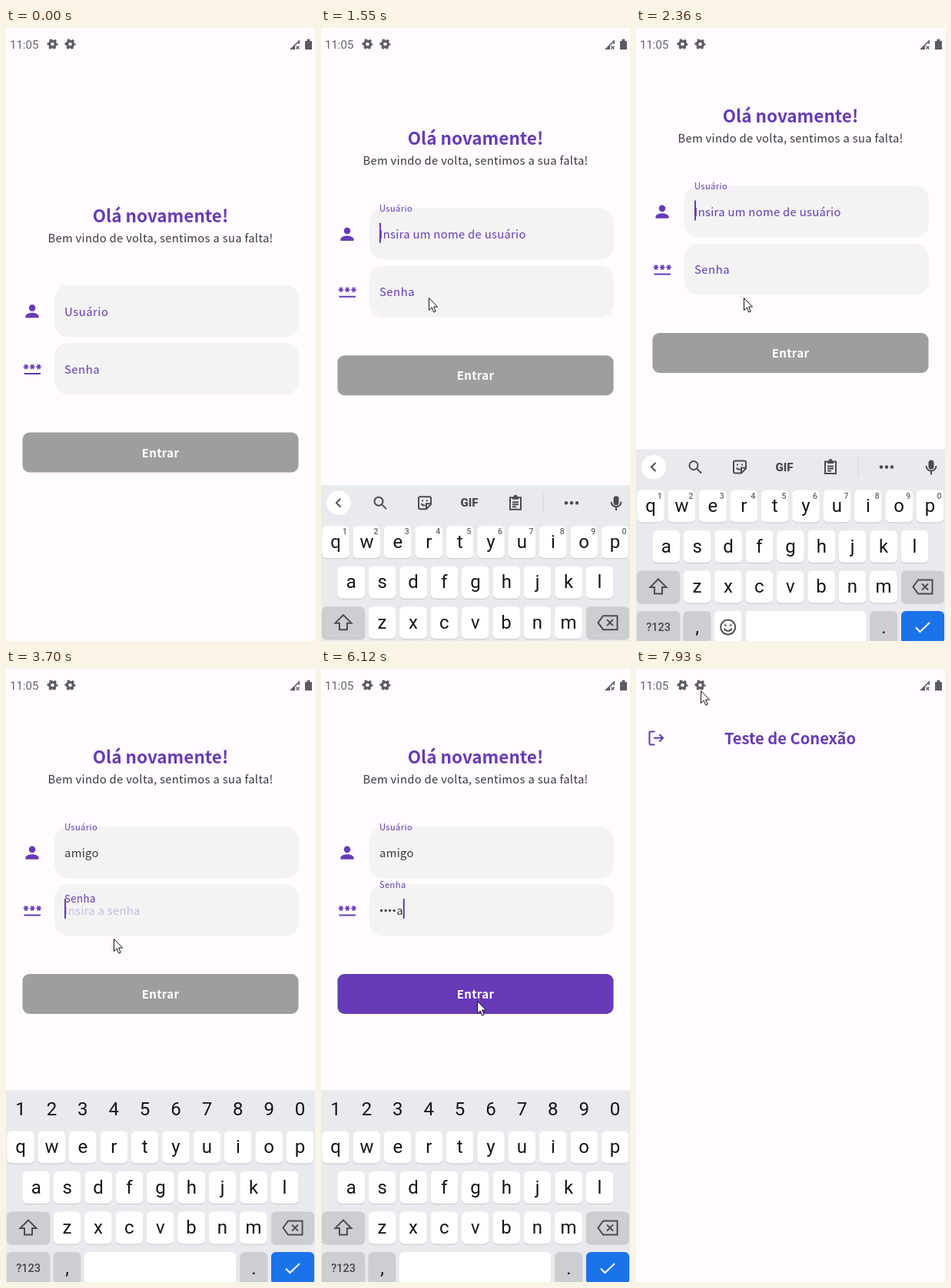
Recreate the animation shown at these times as an HTML page. Size 402x798 px, loop 8000 ms.

```html
<!DOCTYPE html>
<html lang="pt">
<head>
<meta charset="utf-8">
<title>Login</title>
<style>
  html, body { margin: 0; width: 100%; height: 100%; overflow: hidden; background: #fffbff; }
  svg { display: block; }
  text { font: 14.8px "Noto Sans CJK JP", "Noto Sans CJK SC", "Noto Sans CJK", sans-serif; letter-spacing: .3px; white-space: pre; }
  .title { font-weight: 700; letter-spacing: 0; fill: #673ab7; }
  .label { letter-spacing: .55px; fill: #673ab7; }
  .hint { fill: #673ab7; }
  .value, .sub { fill: #3a383e; }
  .mid { text-anchor: middle; }
  .dots { font: 15.5px Roboto, sans-serif; }
  .ui text { font: 24px Roboto, sans-serif; letter-spacing: 0; fill: #151517; text-anchor: middle; }
  .ui .small { font-size: 10.5px; font-weight: 500; fill: #5f6368; }
  .ui .mode { font-size: 14.5px; font-weight: 500; fill: #444649; }
  .ui .word { font-size: 16px; }
  .ui .gif { font-size: 15px; font-weight: 900; fill: #4a4c50; }
  .ui .clock { font-size: 15px; fill: #66646b; text-anchor: start; }
  .line { fill: none; stroke: #4a4c50; stroke-width: 2; }
  .purple { fill: none; stroke: #673ab7; stroke-width: 2; }
</style>
</head>
<body>
<svg width="402" height="798" viewBox="0 0 402 798">
  <defs>
    <path id="star" d="M-3.4 0h6.8M-1.7-3l3.4 6M-1.7 3l3.4-6" stroke="#673ab7" stroke-width="1.6"/>
    <g id="gear" fill="none" stroke="#5d5b62">
      <circle r="3.9" stroke-width="3.2"/>
      <circle r="5.8" stroke-width="2.4" stroke-dasharray="3 3.07" stroke-dashoffset="1.5"/>
    </g>
    <clipPath id="buttonClip"><rect x="21.5" y="526.5" width="359" height="52" rx="9"/></clipPath>
  </defs>

  <g id="login">
    <text class="title mid" x="201" y="252.5" style="font-size:22.5px">Olá novamente!</text>
    <text class="sub mid" x="201" y="278.5">Bem vindo de volta, sentimos a sua falta!</text>
    <path fill="#673ab7" transform="translate(21.2 355.8) scale(1.07)" d="M12 12a4 4 0 1 0 0-8 4 4 0 0 0 0 8zm0 2c-2.67 0-8 1.34-8 4v2h16v-2c0-2.66-5.33-4-8-4z"/>
    <use href="#star" x="26" y="441"/><use href="#star" x="34.3" y="441"/><use href="#star" x="42.6" y="441"/>
    <path class="purple" d="M23.5 450h21.5"/>
    <g id="fields"></g>
    <rect id="button" x="21.5" y="526.5" width="359" height="52" rx="9"/>
    <g clip-path="url(#buttonClip)"><circle id="ripple" cx="191" cy="552.5" fill="#fff" opacity=".14"/></g>
    <text class="mid" x="201" y="558.5" style="font-size:15px;font-weight:700" fill="#fff">Entrar</text>
    <rect id="caret" width="2" height="26" fill="#673ab7"/>
  </g>

  <g id="home">
    <rect width="402" height="798" fill="#fffbff"/>
    <path class="purple" d="M24.5 81.5H19a1.5 1.5 0 0 0-1.5 1.5V97a1.5 1.5 0 0 0 1.5 1.5H24.5M23 89.8H35M30.5 85l4.6 4.8-4.6 4.8"/>
    <text class="title mid" x="200.5" y="97.5" style="font-size:20.1px">Teste de Conexão</text>
  </g>

  <g class="ui">
    <text class="clock" x="5" y="27">11:05</text>
    <use href="#gear" x="60.5" y="21"/><use href="#gear" x="83.5" y="21"/>
    <path fill="#5d5b62" d="M369 28L382 15V21H380.5V18.7L376 23.2V28ZM389 17h2.5v-2.5h4V17H398V28H389z"/>
    <path d="M377.5 23.5l4 4m0-4l-4 4" stroke="#5d5b62" stroke-width="1.4"/>
  </g>

  <g id="keyboard" class="ui"></g>
  <path id="mouse" d="M.5 .5V16.5L4.2 13L6.8 19L9.2 18L6.6 12H11.6Z" fill="#fff" stroke="#111"/>
</svg>
<script>
const $ = id => document.getElementById(id);
const set = (id, attrs) => { for (const k in attrs) $(id).setAttribute(k, attrs[k]); };
const show = (id, on) => $(id).style.display = on ? '' : 'none';
const mix = (a, b, u) => a + (b - a) * u;

const field = (name, label, hint, y) => `
  <rect x="63" y="${y}" width="318" height="67" rx="18" fill="#f3f3f3"/>
  <text id="${name}Hint" class="hint" x="76" y="${y + 39.5}">${hint}</text>
  <text id="${name}Value" class="value" x="76" y="${y + 39.5}"></text>
  <text id="${name}Label" class="label">${label}</text>`;
$('fields').innerHTML = field('user', 'Usuário', 'Insira um nome de usuário', 335) +
  '<path id="underline" stroke="#3a383e" d="M76 377H76"/>' +
  field('pass', 'Senha', 'Insira a senha', 410);

const PITCH = 40.4;
const label = (text, x, y, cls = '') => `<text class="${cls}" x="${x}" y="${y}">${text}</text>`;
const key = (x, y, w, fill = '#fff', text = '', cls) =>
  `<rect x="${x}" y="${y + 1}" width="${w}" height="42" rx="6" fill="#c3c5c9"/>
   <rect x="${x}" y="${y}" width="${w}" height="42" rx="6" fill="${fill}"/>` +
  label(text, x + w / 2, y + (cls ? 26 : 28.5), cls);
const row = (letters, x, y) => [...letters].map((c, i) => key(x + i * PITCH, y, 35.6, '#fff', c)).join('');
const perDigit = draw => [...'1234567890'].map((c, i) => draw(c, 19 + i * PITCH)).join('');
const GREY = '#ccced2';

$('keyboard').innerHTML = `
  <rect width="402" height="300" fill="#e8eaed"/>
  ${row('qwertyuiop', 1.2, 53)}${row('asdfghjkl', 21.5, 105.5)}${row('zxcvbnm', 61.7, 158)}
  ${key(1.2, 158, 56, GREY)}${key(345, 158, 56, GREY)}
  ${key(1.2, 210.5, 56, GREY, '?123', 'mode')}${key(61.7, 210.5, 35.6, GREY, ',')}
  ${key(102, 210.5, 197.5)}${key(304.5, 210.5, 35.6, GREY, '.')}${key(345, 210.5, 56, '#1a73e8')}
  <path class="line" d="M29 169L39.5 179.5H34V188H24V179.5H18.5Z
    M360.5 179L367 170H385.500V188H367ZM372 175l8 8m0-8l-8 8"/>
  <path class="line" style="stroke:#fff" d="M364 232l5.500 5.500L382 225.500"/>
  <g id="digits">${perDigit((c, x) => label(c, x, 32.5))}</g>
  <g id="textMode">
    ${perDigit((c, x) => label(c, x + 12, 64, 'small'))}
    <rect x="136" y="209" width="8" height="50" fill="#e8eaed"/>
    ${key(102, 210.5, 35.6)}${key(142.5, 210.5, 157)}
    <circle class="line" cx="119.700" cy="231.500" r="9.500"/>
    <path class="line" d="M115 229h2.500M122 229h2.500M114.500 233.500q5.200 6 10.400 0"/>
    <circle cx="23" cy="23" r="15.8" fill="#fff"/>
    <path id="chevron" class="line" d="M2.500-5.500l-5.500 5.500 5.500 5.500"/>
    <rect x="380.5" y="14" width="7" height="12" rx="3.500" fill="#4a4c50"/>
    <path class="line" d="M377.500 21.500a6.500 6.500 0 0 0 13 0M384 28v5"/>
    <g id="tools">
      <circle class="line" cx="75" cy="21" r="5.500"/><path class="line" d="M79 25l6 6"/>
      <path class="line" d="M129 15H141a2 2 0 0 1 2 2V25L137 31H129a2 2 0 0 1-2-2V17a2 2 0 0 1 2-2ZM143 24h-6v7M131 20h2M137 20h2M130.500 24q2 3 5 2"/>
      ${label('GIF', 193, 28.3, 'gif')}
      <path class="line" d="M246 16H260V31.500H246ZM249 17.500H257M249 22h8M249 25h8M249 28h5"/>
      <circle cx="253" cy="15" r="2.500" fill="#4a4c50"/>
      <path d="M289 11V35" stroke="#d2d4d8"/>
      <path d="M319 23h0M326 23h0M333 23h0" stroke="#4a4c50" stroke-width="4.500" stroke-linecap="round"/>
    </g>
    <g id="words">
      <path d="M151 13V33M256 13V33" stroke="#d2d4d8"/>
      ${[0, 1, 2].map(i => `<text id="word${i}" class="word" x="${99 + i * 105}" y="29"></text>`).join('')}
    </g>
  </g>`;

function progress(t, start, end) {
  if (t < start) return 0;
  const step = Math.floor((t - start) / 67 + .1) + 1;
  return Math.min(1, step / (Math.round((end - start) / 67) + 1));
}
const typed = (times, t) => times.filter(at => at <= t).length;

const USER = 'amigo', USER_TIMES = [2490, 2630, 2770, 2920, 3060];
const PASS = 'senha', PASS_TIMES = [4170, 4510, 4640, 4840, 4970];
const MOVES = [[460, 970, 128, 339], [1040, 1220, 140, 351], [5910, 6120, 203, 432], [7310, 7930, 84, 28]];

function drawMouse(t) {
  let x = 299, y = 685;
  for (const [start, end, toX, toY] of MOVES) {
    const u = progress(t, start, end), s = u * u * (3 - 2 * u);
    x = mix(x, toX, s);
    y = mix(y, toY, s);
  }
  show('mouse', t >= 460);
  set('mouse', { transform: `translate(${x} ${y})` });
}

function drawField(name, y, float, hasValue) {
  set(name + 'Label', { transform: `translate(76 ${mix(y + 39.5, y + 4, float)}) scale(${mix(1, .75, float)})` });
  set(name + 'Hint', { opacity: hasValue ? 0 : float ** 1.4 });
}

function drawForm(t) {
  const users = typed(USER_TIMES, t), chars = typed(PASS_TIMES, t);
  const onPass = t >= 3700;
  set('login', { transform: `translate(0 ${-129.5 * (1 - (1 - progress(t, 1420, 1830)) ** 2.66)})` });
  drawField('user', 335, progress(t, 1420, 1560) ** .75, users);
  drawField('pass', 410, progress(t, 3700, 3840) ** .75, chars);
  $('userValue').textContent = USER.slice(0, users);
  $('passValue').innerHTML = chars
    ? `<tspan class="dots">${'•'.repeat(chars - 1)}</tspan>${PASS[chars - 1]}` : '';

  const value = $(onPass ? 'passValue' : 'userValue');
  const end = 76 + (value.textContent ? value.getComputedTextLength() : 0);
  const off = [[0, 1420], [1830, 2360], [3430, 3700], [5510, 5980]].some(([a, b]) => t >= a && t < b);
  set('caret', { x: end, y: onPass ? 428.5 : 354 });
  show('caret', !off);
  set('underline', { d: `M76 377H${end}` });
  show('underline', users && t < 3230);

  const u = progress(t, 4170, 4370);
  set('button', { fill: `rgb(${mix(158, 103, u)},${mix(158, 58, u)},${mix(158, 183, u)})` });
  set('ripple', { r: 32 * progress(t, 6310, 6380) });
}

function drawKeyboard(t) {
  const up = 1 - (1 - progress(t, 1420, 1830)) ** 3;
  const down = progress(t, 6520, 6720) ** 1.79;
  set('keyboard', { transform: `translate(0 ${548.5 + 250 * (1 - up + down)})` });
  show('digits', t >= 3700);
  show('textMode', t < 3700);

  const n = typed(USER_TIMES, t);
  show('tools', !n);
  show('words', n);
  set('chevron', { transform: `translate(23 23) scale(${n ? -1 : 1} 1)` });
  const words = t < 3230 ? [USER.slice(0, n), 'amigo', 'amigos'] : ['amigos', 'amigo', 'amigas'];
  words.forEach((word, i) => $('word' + i).textContent = word);
}

function drawHome(t) {
  const u = progress(t, 6520, 6720), scale = 1 - .104 * (1 - u) ** 4;
  show('home', u > 0);
  show('login', u < .5);
  set('home', {
    opacity: Math.min(1, u * 2),
    transform: `translate(201 399) scale(${scale}) translate(-201 -399)`
  });
}

function frame(now) {
  const t = now % 8000;
  drawForm(t);
  drawKeyboard(t);
  drawHome(t);
  drawMouse(t);
  requestAnimationFrame(frame);
}
frame(0);
</script>
</body>
</html>
```
